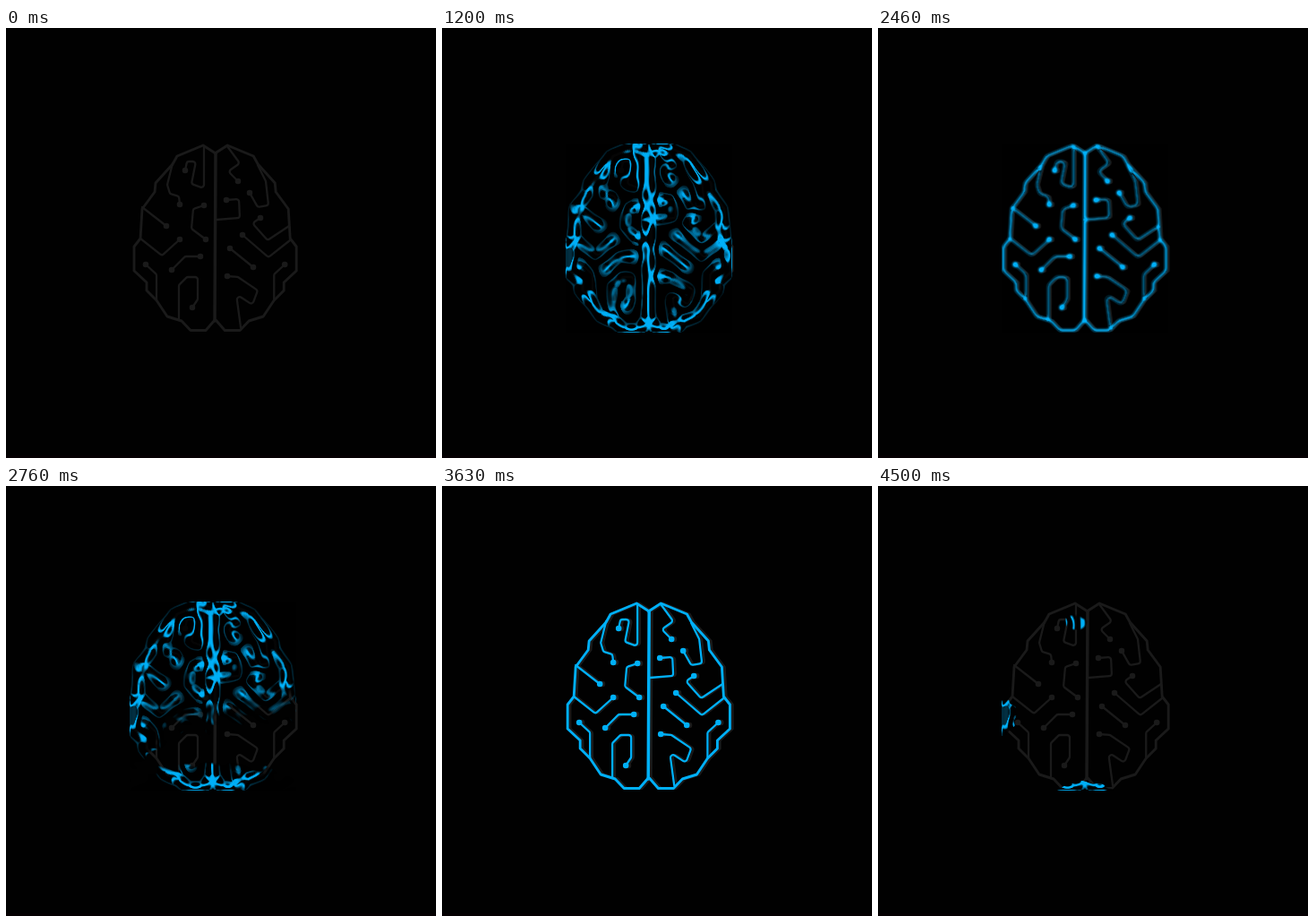
Recreate the animation shown at these times as an HTML page with a canvas. Size 480x480 px, loop 4530 ms.

```html
<!DOCTYPE html>
<html lang="en">
<head>
<meta charset="utf-8">
<title>Circuit brain</title>
<style>
html, body { margin: 0; height: 100%; overflow: hidden; background: #010101; }
canvas { display: block; }
</style>
</head>
<body>
<canvas id="stage" width="480" height="480"></canvas>
<script>
const LOOP = 4530, STEP = 30;
const X0 = 138, Y0 = 129, W = 186, H = 211, SHIFT = -2.8;
const AXIS = 233.6;
const BLUE = [0, 176, 248];

// Key points of the left half; the right half is its mirror image
const rim = `234,140 220,131 191,143 186,152 167,173 166,183 152,202 150,235 143,244 143,271
  157,284 157,293 168,304 180,322 196,327 206,337.5 223,337.5 233,326`;
const hook = '168,304 168,275 156,264';
// Wires end in a node, links have one at both ends
const wires = [
  '186,151 180,175 183,185 193,188 194,197',
  '221,133 221,179 207,174 212,149 202,149 200,159',
  '152,200 179,221',
  '150,235 174,254 194,236',
  '193,326 193,287 202,278 214,278 214,303 208,312',
  '247,132 261,151 248,160 259,171',
  '281,153 290,171 293,198 281,200 272,184',
  '235,214 261,212 260,191 246,192',
  '316,221 292,237 275,218 284,212',
  '317,237 293,256 264,231',
  '262,334 257,297 275,309 281,293 259,278 247,277'
].map(points);
const links = ['221,198 209,202 207,224 223,236', '217,255 200,255 185,270', '250,246 276,267'].map(points);

function points(text) {
  return text.trim().split(/\s+/).map(p => p.split(',').map(Number));
}
const mirror = list => list.map(([x, y]) => [2 * AXIS - x, y]);

const outlines = [points(rim), mirror(points(rim))];
wires.push(points(hook), mirror(points(hook)));
const nodes = [...wires, ...links].map(w => w[w.length - 1]).concat(links.map(w => w[0]));

// Places where the glow starts: x, y, radii, slowness
const seeds = [[220, 152, 12, 7, 0.45], [138, 258, 16, 19, 4], [231, 340, 27, 10, 3]];

function makeCanvas(w, h) {
  const c = document.createElement('canvas');
  c.width = w;
  c.height = h;
  return c.getContext('2d', { willReadFrequently: true });
}

function strokeLines(c, lines, width, radius) {
  c.lineWidth = width;
  c.beginPath();
  for (const line of lines) {
    c.moveTo(...line[0]);
    for (let i = 1; i < line.length - 1; i++) c.arcTo(...line[i], ...line[i + 1], radius);
    c.lineTo(...line[line.length - 1]);
  }
  c.stroke();
}

function drawBrain(c, color) {
  c.strokeStyle = c.fillStyle = color;
  c.lineJoin = c.lineCap = 'round';
  strokeLines(c, outlines, 2.9, 0);
  strokeLines(c, [[[234, 140], [233, 327]]], 3.5, 0);
  strokeLines(c, [...wires, ...links], 2.3, 3);
  c.beginPath();
  for (const [x, y] of nodes) {
    c.moveTo(x, y);
    c.arc(x, y, 3.3, 0, 7);
  }
  c.fill();
}

const ctx = document.getElementById('stage').getContext('2d');
const glow = makeCanvas(W, H);
glow.translate(SHIFT - X0, -Y0);
drawBrain(glow, '#000');
const pixels = glow.getImageData(0, 0, W, H).data;
const art = Float32Array.from({ length: W * H }, (_, i) => pixels[i * 4 + 3] / 255);

const clamp = (v, lo, hi) => Math.max(lo, Math.min(hi, v));

const delay = art.map((_, i) => {
  const x = X0 + i % W, y = Y0 + Math.floor(i / W);
  const wobble = 1 + 0.14 * Math.sin(x * 0.21 + 2 * Math.sin(y * 0.13)) * Math.cos(y * 0.24);
  return Math.min(...seeds.map(([sx, sy, rx, ry, slow]) =>
    (Math.hypot((x - sx) / rx, (y - sy) / ry) * wobble - 1) * slow));
});

function blurAxis(src, sigma, dx, dy) {
  const r = Math.ceil(sigma * 3), out = new Float32Array(W * H), kernel = [];
  let sum = 0;
  for (let k = -r; k <= r; k++) sum += kernel[k + r] = Math.exp(-k * k / (2 * sigma * sigma));
  for (let y = 0, i = 0; y < H; y++) {
    for (let x = 0; x < W; x++, i++) {
      let v = 0;
      for (let k = -r; k <= r; k++) {
        v += kernel[k + r] * src[clamp(y + k * dy, 0, H - 1) * W + clamp(x + k * dx, 0, W - 1)];
      }
      out[i] = v / sum;
    }
  }
  return out;
}

function sample(x, y) {
  x = clamp(x, 0, W - 1.01);
  y = clamp(y, 0, H - 1.01);
  const i = Math.floor(y) * W + Math.floor(x), fx = x % 1, fy = y % 1;
  const top = art[i] + (art[i + 1] - art[i]) * fx;
  const low = art[i + W] + (art[i + W + 1] - art[i + W]) * fx;
  return top + (low - top) * fy;
}

// Bends the lines along the slope of their own blurred image; low slopes stay dim
function drawGlass(d) {
  const e = Math.min(1, d / 240);
  const sigma = 1.2 + 4.6 * e;
  const power = sigma ** 3 * (3 - e);
  const level = (Math.max(0, 600 - d) / 150) ** 3;
  const edge = 0.15 + 0.25 * level;
  const matte = Math.min(0.8, d / 200);
  const bump = blurAxis(blurAxis(art, sigma, 1, 0), sigma, 0, 1);
  const img = glow.createImageData(W, H);
  for (let y = 0, i = 0; y < H; y++) {
    for (let x = 0; x < W; x++, i++) {
      const mask = clamp((level - delay[i]) / edge + 0.5, 0, 1);
      if (!mask) continue;
      const gx = (bump[x < W - 1 ? i + 1 : i] - bump[x ? i - 1 : i]) / 2;
      const gy = (bump[y < H - 1 ? i + W : i] - bump[y ? i - W : i]) / 2;
      const shade = Math.min(1, bump[i] * sigma / 1.2) ** 2;
      const a = sample(x + gx * power, y + gy * power) * shade;
      const cover = a + (1 - a) * matte;
      for (let c = 0; c < 3; c++) img.data[i * 4 + c] = cover ? BLUE[c] * a / cover : 0;
      img.data[i * 4 + 3] = 255 * cover * mask;
    }
  }
  glow.putImageData(img, 0, 0);
  ctx.drawImage(glow.canvas, X0, Y0);
}

// Time away from the clear blue picture; null while unlit
function distance(t) {
  if (t < 180) return null;
  if (t < 960) return Math.max(0, 630 - t);
  const u = (t - 960) % 1500;
  return Math.max(0, Math.min(u + STEP, 1170 - u));
}

function draw(t) {
  ctx.fillStyle = '#010101';
  ctx.fillRect(0, 0, 480, 480);
  ctx.fillStyle = '#050002';
  ctx.fillRect(0, 477, 480, 3);
  drawBrain(ctx, '#1a1a1a');
  const d = distance(t);
  if (d === 0) {
    ctx.save();
    ctx.translate(SHIFT, 0);
    drawBrain(ctx, `rgb(${BLUE})`);
    ctx.restore();
  } else if (d) {
    drawGlass(d);
  }
}

const start = performance.now();
let last = -1;
function tick() {
  const t = Math.floor((performance.now() - start) % LOOP / STEP) * STEP;
  if (t !== last) draw(last = t);
  requestAnimationFrame(tick);
}
tick();
</script>
</body>
</html>
```
